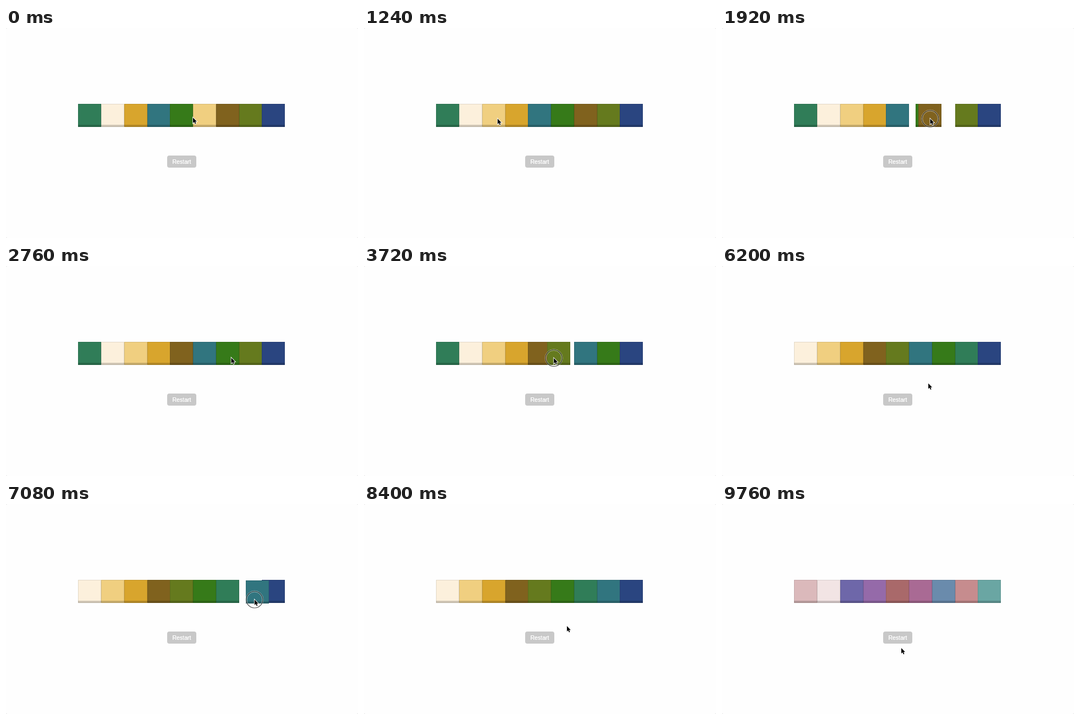
Animation, 640 px wide and 382 px high, one loop 9800 ms. Source, as an HTML page:

```html
<!DOCTYPE html>
<html lang="en">
<head>
<meta charset="utf-8">
<title>Colour sort</title>
<style>
html, body { margin: 0; width: 100%; height: 100%; overflow: hidden; background: #e2e2e2; }
#stage { position: relative; width: 640px; height: 382px; overflow: hidden; background: #fefefe; border-radius: 3px; }
.tile { position: absolute; width: 42px; height: 42px;
  box-shadow: inset 0 0 0 1px rgba(0,0,0,.1), inset 0 -4px rgba(0,0,0,.18); }
#restart { position: absolute; left: 293px; top: 232px; width: 53px; height: 22px; border-radius: 4px; background: #c8c8c8;
  color: #fff; font: 10.6px/22px "Liberation Sans", Arial, sans-serif; text-align: center; text-shadow: 0 0 .5px #fff; }
svg { position: absolute; left: 0; top: 0; z-index: 9; }
</style>
</head>
<body>
<div id="stage">
  <div id="restart">Restart</div>
  <svg width="640" height="382">
    <g id="pointer">
      <g id="ring" fill="none" stroke="#fff" stroke-opacity=".5">
        <circle r="16"/>
        <circle r="15" stroke="#222" stroke-opacity=".85" stroke-width="1.2"/>
        <circle r="14"/>
      </g>
      <path d="M0 0V10L2.3 7.8 3.9 11.4 5.5 10.7 4 7.2H7Z" stroke="#fff" stroke-width="1.7" paint-order="stroke"/>
    </g>
  </svg>
</div>
<script>
const LOOP = 9800, LEFT = 131.4, TOP = 138, STEP = 41.75, SNAP = 100;
const WIN = 7240, RESET = 8820;
const first = ['#307d58', '#fcf0dc', '#d8a52d', '#31757f', '#367a19', '#f0cf80', '#80621e', '#657a1e', '#2a4580'];
const second = ['#dbb9bb', '#f2e4e4', '#6e67a9', '#956aa9', '#a9696a', '#a96a94', '#6a8bac', '#c68c8e', '#6aa6a3'];

// grip: pointer offset inside the tile; over: slots dragged past the goal; bow: dip of the path leading there
const drags = [
  { from: 5, to: 2, press: 270, release: 980, grip: 28, y: 165 },
  { from: 6, to: 4, press: 1760, release: 2200, grip: 22, y: 165 },
  { from: 7, to: 5, press: 2895, release: 3740, grip: 12, y: 167.5, over: -.17 },
  { from: 0, to: 7, press: 4450, release: 5220, grip: 24, y: 162, drop: 7.6 },
  { from: 5, to: 7, press: 6500, release: 7100, grip: 16, y: 173, drop: 1, over: .3, bow: 68, rest: 700 }
];
const click = { press: 8800, release: 8960, x: 324, y: 248 };

// Pointer path: travel to a tile, drag it, rest, travel on
const path = [{ t: 0, x: 340, y: 163 }];
for (const { from, to, press, release, grip, y, drop = 0, over = 0, bow = 0, rest = 260 } of drags) {
  const end = { x: LEFT + (to + over) * STEP + grip, y: y + drop };
  path.push({ t: press, x: LEFT + from * STEP + grip, y, bow }, { t: release, ...end }, { t: release + rest, ...end });
}
path.push({ ...click, t: click.press }, { ...click, t: 9480 }, { t: 9760, x: 326, y: 262 }, { t: LOOP, x: 326, y: 262 });

const clamp = v => Math.max(0, Math.min(1, v));
const smooth = v => (v = clamp(v)) * v * (3 - 2 * v);
const $ = id => document.getElementById(id);

const tiles = first.map(() => {
  const el = document.createElement('div');
  el.className = 'tile';
  return $('stage').appendChild(el);
});

function pointerAt(t) {
  const i = Math.max(1, path.findIndex(p => p.t >= t));
  const a = path[i - 1], b = path[i];
  const k = smooth((t - a.t) / (b.t - a.t));
  return { x: a.x + (b.x - a.x) * k, y: a.y + (b.y - a.y) * k + (b.bow || 0) * Math.sin(Math.PI * k) };
}

// Tile places as { slot, y, held }, indexed by tile
function layout(t) {
  const order = first.map((_, i) => i);
  let active = null;
  if (t < RESET) for (const d of drags) {
    if (t >= d.release + SNAP) order.splice(d.to, 0, order.splice(d.from, 1)[0]);
    else if (t >= d.press) active = d;
  }
  const places = [];
  order.forEach((id, slot) => places[id] = { slot, y: 0, held: false });
  if (!active) return places;

  const { from, to, press, release } = active;
  const grab = pointerAt(press), now = pointerAt(Math.min(t, release));
  const settle = smooth((t - release) / SNAP);
  const at = from + (now.x - grab.x) / STEP;
  const slot = at + (to - at) * settle;
  const dir = Math.sign(to - from);
  order.forEach((id, i) => {
    if (i === from) places[id] = { slot, y: (now.y - grab.y) * (1 - settle), held: true };
    else if ((i - from) * dir > 0) {
      const passed = 1 - (i - slot) * dir;
      places[id].slot -= dir * smooth((passed - .5) / .3);
    }
  });
  return places;
}

// Tiles jump in a wave when sorted, and drop in after a restart
function hop(t, slot) {
  if (t >= RESET) return -76 * (1 - clamp((t - RESET) / 180)) ** 2;
  return -97 * Math.sin(Math.PI * clamp((t - WIN - slot * 17) / 260));
}

function draw(t) {
  const colors = t < RESET ? first : second;
  layout(t).forEach((p, i) => {
    const s = tiles[i].style;
    s.background = colors[i];
    s.left = LEFT + p.slot * STEP + 'px';
    s.top = TOP + p.y + hop(t, p.slot) + 'px';
    s.zIndex = p.held ? 2 : 1;
  });
  const { x, y } = pointerAt(t);
  $('pointer').setAttribute('transform', `translate(${x} ${y})`);
  const pressed = [...drags, click].some(d => t >= d.press && t < d.release);
  $('ring').style.display = pressed ? '' : 'none';
}

const start = performance.now();
function tick() {
  draw((performance.now() - start) % LOOP);
  requestAnimationFrame(tick);
}
tick();
</script>
</body>
</html>
```
